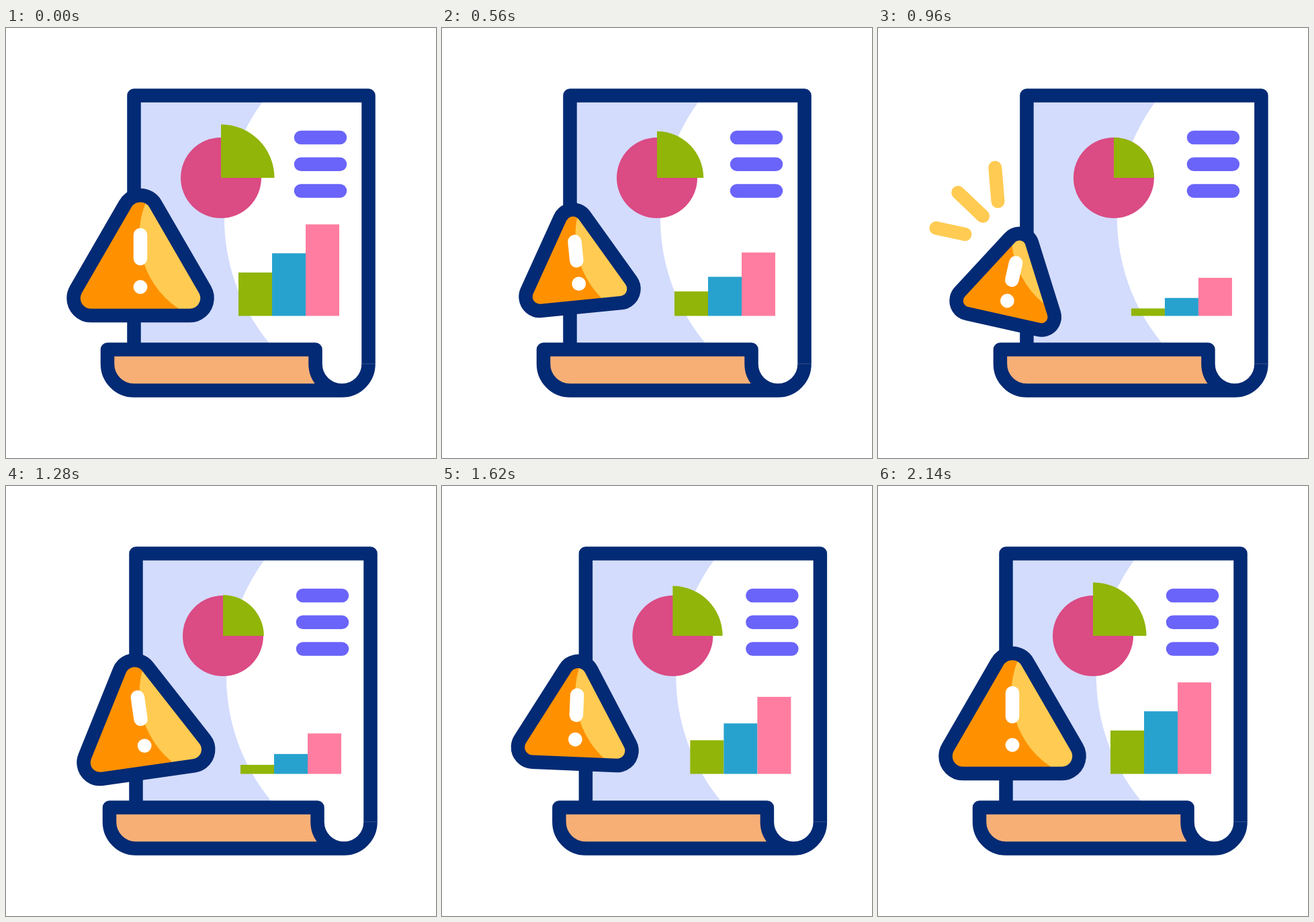
These frames come from a looping animation (640x640 px, 2400 ms). An HTML page with a canvas:

```html
<!DOCTYPE html>
<html lang="en">
<head>
<meta charset="utf-8">
<title>Report alert</title>
<style>
  html, body { margin: 0; width: 100%; height: 100%; overflow: hidden; background: #fff; }
  canvas { display: block; }
</style>
</head>
<body>
<canvas width="640" height="640"></canvas>
<script>
const ctx = document.querySelector('canvas').getContext('2d');
const { PI } = Math;
const LOOP = 2400, LINE = 20.5;
const NAVY = '#032a74', LIGHT = '#d3dcfd', PEACH = '#f7af76', ORANGE = '#ff9100',
  YELLOW = '#ffcb52', PURPLE = '#6a64fa', GREEN = '#91b508', BLUE = '#27a2ce',
  PINK = '#ff7da0', MAGENTA = '#db4b84';

const mix = (a, b, p) => a + (b - a) * p;

// Eased step from 0 to 1 between two times.
function ramp(t, from, to) {
  const u = Math.min(1, Math.max(0, (t - from) / (to - from)));
  return u * u * (3 - 2 * u);
}

const shrink = t => ramp(t, 170, 925) - ramp(t, 1200, 1840);
const shift = t => 36.5 * (ramp(t, 690, 1050) - ramp(t, 1075, 1325))
  + 30 * (ramp(t, 1325, 1750) - ramp(t, 1750, 2140));

// Key poses of the warning sign: time, height, scale, turn in degrees.
const poses = [
  [0, 339, 1, 0],
  [360, 391.5, .755, -16.3],
  [740, 303.4, .873, 7],
  [960, 372, .748, 12.7],
  [1280, 343.3, .94, -8.1],
  [1620, 337.6, .853, 2.4],
  [2140, 339, 1, 0],
];

// Smooth curve through the poses, at rest at both ends.
function poseAt(t) {
  const last = poses.length - 1;
  const i = poses.findIndex(p => p[0] > t) - 1;
  if (i < 0) return poses[last];
  const [a, b] = [poses[i], poses[i + 1]];
  const d = b[0] - a[0], u = (t - a[0]) / d, w = 1 - u;
  const slope = (k, c) => k % last === 0 ? 0
    : (poses[k + 1][c] - poses[k - 1][c]) / (poses[k + 1][0] - poses[k - 1][0]);
  return a.map((v, c) => v * w * w * (1 + 2 * u) + b[c] * u * u * (1 + 2 * w)
    + d * u * w * (slope(i, c) * w - slope(i + 1, c) * u));
}

function fill(color, path) {
  ctx.fillStyle = color;
  ctx.fill(path);
}

function stroke(color, path, width = LINE) {
  ctx.strokeStyle = color;
  ctx.lineWidth = width;
  ctx.stroke(path);
}

function segment(color, x1, y1, x2, y2, width) {
  stroke(color, new Path2D(`M${x1} ${y1}L${x2} ${y2}`), width);
}

function circle(x, y, r) {
  const path = new Path2D();
  path.arc(x, y, r, 0, PI * 2);
  return path;
}

const shade = new Path2D('M190.5 100.5H389A292 292 0 0 0 400 478.5H190.5Z');
const roll = new Path2D('M151 478.5H460.5V500A39.5 39.5 0 0 0 500 539.5H190.5A39.5 39.5 0 0 1 151 500Z');
const sheet = new Path2D('M190.5 478.5V100.5H539.5V500A39.5 39.5 0 0 1 460.5 500V478.5H151V500A39.5 39.5 0 0 0 190.5 539.5H500');
const glow = circle(330, 308.5, 131.5);

function drawReport(t) {
  const p = shrink(t), r = mix(79.5, 60, p);
  ctx.save();
  ctx.translate(shift(t), 0);
  fill(LIGHT, shade);
  fill(PEACH, roll);
  fill(MAGENTA, circle(320, 223, 60));
  fill(GREEN, new Path2D(`M320 223v${-r}a${r} ${r} 0 0 1 ${r} ${r}Z`));
  [GREEN, BLUE, PINK].forEach((color, i) => {
    const lineY = 163 + 39.8 * i;
    segment(PURPLE, 439, lineY, 497, lineY);
    const h = 64.6 + 21.4 * i + 7.2 * i * i - (53.5 + 13 * i) * p;
    ctx.fillStyle = color;
    ctx.fillRect(346 + i * 50, 428.5 - h, 50, h);
  });
  stroke(NAVY, sheet);
  ctx.fillStyle = 'rgba(255,255,255,.25)';
  ctx.fillRect(529.5, 499.5, 20, .7);
  ctx.restore();
}

// Rays shoot outwards, then their tails catch up.
function drawRays(t) {
  const head = ramp(t, 790, 1020), tail = ramp(t, 1060, 1240);
  if (head <= tail) return;
  for (const [x, y, dx, dy] of [[178.5, 258, -5, -60], [156, 280, -44, -42], [129.5, 307, -51.5, -11]])
    segment(YELLOW, x + dx * tail, y + dy * tail, x + dx * head, y + dy * head, 20);
}

function drawSign(t) {
  const [, y, scale, degrees] = poseAt(t);
  const turn = degrees * PI / 180;
  const sin = Math.sin(turn) * scale, cos = Math.cos(turn) * scale;
  const place = (px, py) => [200 + px * cos - py * sin, y + px * sin + py * cos];
  // Only the geometry scales; line widths stay constant.
  const shape = new Path2D();
  [[0, -64], [73.5, 63], [-73.5, 63]].forEach(([px, py], i) => {
    const from = turn + (-150 + 120 * i) * PI / 180;
    shape.arc(...place(px, py), 26 * scale, from, from + PI * 2 / 3);
  });
  shape.closePath();
  fill(ORANGE, shape);
  ctx.save();
  ctx.clip(shape);
  fill(YELLOW, glow);
  ctx.restore();
  stroke(NAVY, shape);
  segment('#fff', ...place(0, -31), ...place(0, 4));
  fill('#fff', circle(...place(0, 46.5), 10.4));
}

function frame() {
  const t = performance.now() % LOOP;
  ctx.fillStyle = '#fff';
  ctx.fillRect(0, 0, 640, 640);
  ctx.lineCap = ctx.lineJoin = 'round';
  drawReport(t);
  drawRays(t);
  drawSign(t);
  requestAnimationFrame(frame);
}
frame();
</script>
</body>
</html>
```
